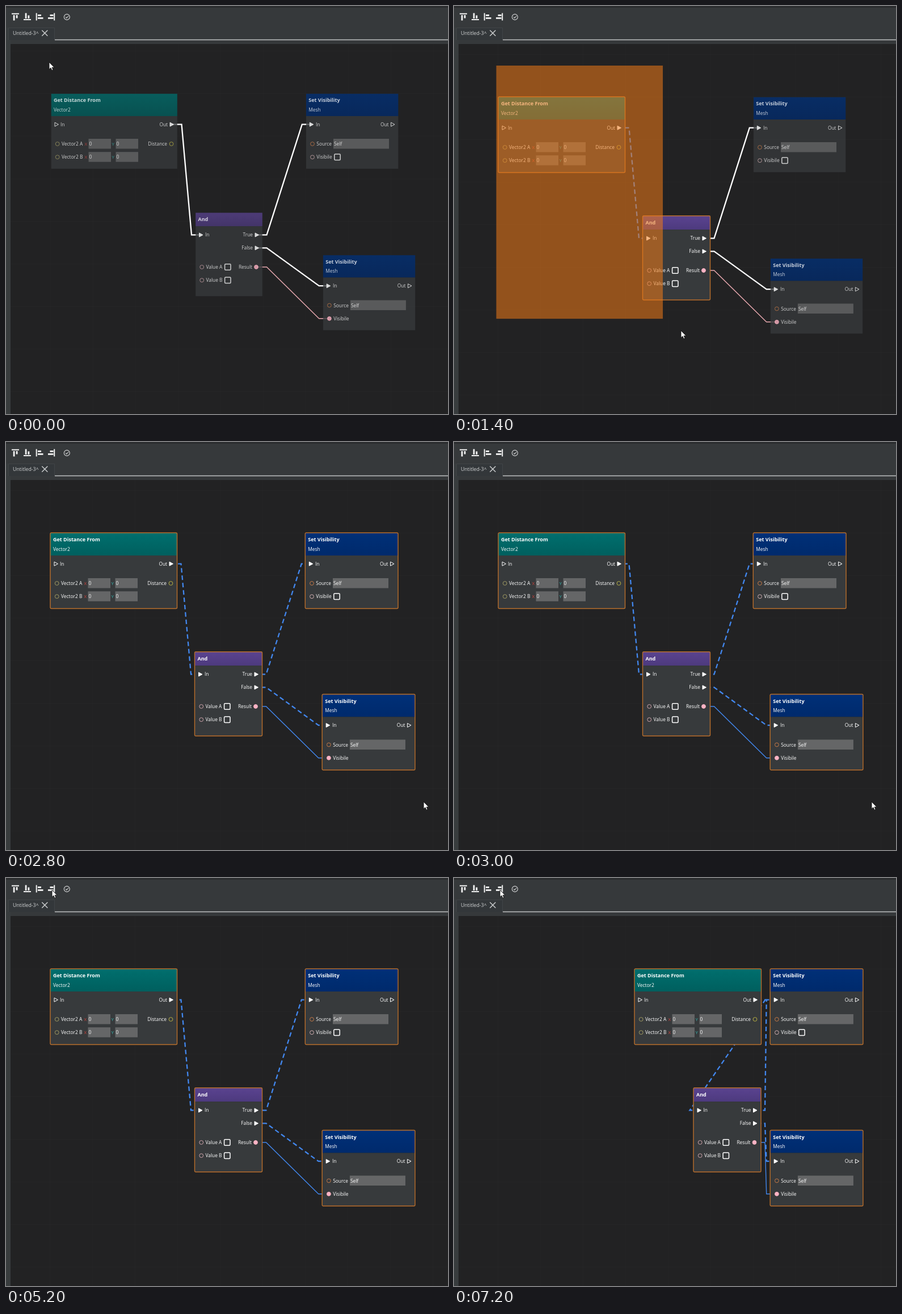
These frames come from a looping animation (779x719 px, 7.4 s). An HTML page with a canvas:

```html
<!DOCTYPE html>
<html lang="en">
<head>
<meta charset="utf-8">
<title>Node graph: select and align</title>
<style>
  html, body { margin: 0; width: 100%; height: 100%; overflow: hidden; background: #222223; }
  canvas { display: block; }
</style>
</head>
<body>
<canvas id="stage" width="779" height="719"></canvas>
<script>
const ctx = document.getElementById('stage').getContext('2d');
const LOOP = 7400, STEP = 200;
const FONT = '"Open Sans", "Noto Sans", sans-serif';
const PINK = '#ffb3c4', ORANGE = '#b96e2b', BLUE = '#4287ee';

// x moves to alignedX when "align right" is pressed
const nodes = [
  { kind: 'distance', title: 'Get Distance From', sub: 'Vector2', x: 78, alignedX: 318, y: 160, w: 223.5, h: 133.5, head: 40, colors: ['#006f6e', '#005f5e'] },
  { kind: 'and', title: 'And', x: 332.5, alignedX: 422, y: 369.7, w: 119, h: 148.3, head: 24.5, colors: ['#5a4390', '#4d3a7e'] },
  { kind: 'mesh', title: 'Set Visibility', sub: 'Mesh', x: 527.3, alignedX: 557.2, y: 160, w: 163.7, h: 133.5, head: 40, colors: ['#003078', '#002a6c'] },
  { kind: 'mesh', linked: true, title: 'Set Visibility', sub: 'Mesh', x: 557.2, alignedX: 557.2, y: 444.5, w: 163.7, h: 133.5, head: 40, colors: ['#003078', '#002a6c'] },
];
const wires = [
  { from: 0, fromY: 54.7, to: 1, toY: 39.7 },
  { from: 1, fromY: 39.7, to: 2, toY: 54.7 },
  { from: 1, fromY: 62.7, to: 3, toY: 54.7 },
  { from: 1, fromY: 96.3, to: 3, toY: 112.3, data: true },
];
// time, x, y of the pointer tip
const pointerPath = [
  [0, 76, 99], [300, 75, 105], [560, 75, 105], [940, 165, 408], [1000, 187, 433],
  [1400, 400, 572], [1940, 693, 631], [2000, 700, 632], [2500, 736, 634],
  [3200, 736, 634], [4200, 139, 47], [4600, 81, 21],
];

const clamp = v => Math.max(0, Math.min(1, v));
const mix = (a, b, k) => a + (b - a) * k;

function pointerAt(t) {
  const i = pointerPath.findIndex(p => p[0] > t);
  if (i < 0) return pointerPath.at(-1).slice(1);
  const [a, b] = [pointerPath[i - 1], pointerPath[i]];
  const k = (t - a[0]) / (b[0] - a[0]);
  return [mix(a[1], b[1], k), mix(a[2], b[2], k)];
}

function rect(x, y, w, h, color) {
  ctx.fillStyle = color;
  ctx.fillRect(x, y, w, h);
}

function line(points, color, width = 1) {
  ctx.beginPath();
  points.forEach(p => ctx.lineTo(...p));
  ctx.strokeStyle = color;
  ctx.lineWidth = width;
  ctx.stroke();
}

function text(str, x, y, { size = 8.4, bold, color = '#fff', align = 'left' } = {}) {
  ctx.font = `${bold ? 700 : 400} ${size}px ${FONT}`;
  ctx.textAlign = align;
  ctx.fillStyle = color;
  ctx.fillText(str, x, y + 3);
}

function arrow(x, y, filled) {
  ctx.beginPath();
  ctx.moveTo(x - 3, y - 3.5);
  ctx.lineTo(x + 3.5, y);
  ctx.lineTo(x - 3, y + 3.5);
  ctx.closePath();
  ctx.strokeStyle = ctx.fillStyle = '#fff';
  ctx.lineWidth = 1;
  ctx.stroke();
  if (filled) ctx.fill();
}

function pin(x, y, color, filled) {
  ctx.beginPath();
  ctx.arc(x, y, 3.4, 0, 7);
  ctx.strokeStyle = ctx.fillStyle = color;
  ctx.lineWidth = 1;
  ctx.stroke();
  if (filled) ctx.fill();
}

function checkbox(x, y) {
  ctx.beginPath();
  ctx.roundRect(x - 5.2, y - 5.2, 10.4, 10.4, 1.5);
  ctx.strokeStyle = '#fff';
  ctx.lineWidth = 1.5;
  ctx.stroke();
}

function field(x, y, w, value) {
  rect(x, y - 9, w, 17.5, '#656667');
  text(value, x + 1, y);
}

function input(y, label, color, filled) {
  pin(11.7, y, color, filled);
  text(label, 19, y);
}

function output(w, y, label, filled) {
  text(label, w - 17.5, y, { align: 'right' });
  arrow(w - 10.5, y, filled);
}

const bodies = {
  distance(w) {
    arrow(10, 54.7);
    text('In', 17, 54.7);
    output(w, 54.7, 'Out', true);
    ['Vector2 A', 'Vector2 B'].forEach((label, i) => {
      const y = 89 + 23.2 * i;
      input(y, label, '#a09a62');
      text('X', 59.5, y, { color: '#d0413a', size: 8 });
      field(66.5, y, 39.5, '0');
      text('Y', 107.5, y, { color: '#35b5af', size: 8 });
      field(114.5, y, 39.5, '0');
    });
    text('Distance', w - 18.5, 89, { align: 'right' });
    pin(w - 11, 89, '#b9b143');
  },
  and(w) {
    arrow(10, 39.7, true);
    text('In', 17.5, 39.7);
    output(w, 39.7, 'True', true);
    output(w, 62.7, 'False', true);
    ['Value A', 'Value B'].forEach((label, i) => {
      const y = 96.3 + 23.2 * i;
      input(y, label, '#cda3aa');
      checkbox(57.3, y);
    });
    text('Result', w - 18.5, 96.3, { align: 'right' });
    pin(w - 11.5, 96.3, PINK, true);
  },
  mesh(w, linked) {
    arrow(10, 54.7, true);
    text('In', 17.7, 54.7);
    output(w, 54.7, 'Out');
    input(89, 'Source', '#c57a48');
    field(48.7, 89, 98, 'Self');
    input(112.3, 'Visibile', linked ? PINK : '#d0aeb0', linked);
    if (!linked) checkbox(55.7, 112.3);
  },
};

function drawNode(n, x, y, selected) {
  ctx.save();
  ctx.translate(x, y);
  ctx.globalAlpha = selected ? 1 : 0.77;
  const inset = selected ? 0 : 0.7;
  const fill = ctx.createLinearGradient(0, 0, 0, n.head);
  n.colors.forEach((c, i) => fill.addColorStop(i, c));
  rect(inset, inset, n.w - 2 * inset, n.head - inset, fill);
  rect(inset, n.head, n.w - 2 * inset, n.h - n.head - inset, '#373a3c');
  if (selected) {
    ctx.beginPath();
    ctx.roundRect(0, 0, n.w, n.h, 2);
    ctx.strokeStyle = ORANGE;
    ctx.lineWidth = 1.4;
    ctx.stroke();
  }
  text(n.title, 5, 12, { bold: true, size: 9 });
  if (n.sub) text(n.sub, 5, 28.7);
  bodies[n.kind](n.w, n.linked);
  ctx.restore();
}

// Drawn from the receiving end, so the marching dashes stay anchored there
function drawWire(wire, placed, t) {
  const a = placed[wire.from], b = placed[wire.to];
  const x1 = a.x + a.n.w - 11, y1 = a.y + wire.fromY;
  const x2 = b.x + 10, y2 = b.y + wire.toY;
  const selected = a.selected && b.selected;
  if (selected && !wire.data) {
    ctx.setLineDash([8, 5]);
    ctx.lineDashOffset = t * 0.039 - 6.6;
  }
  line([[x2, y2], [x2 - 16.5, y2], [x1 + 18, y1], [x1, y1]],
    selected ? BLUE : wire.data ? '#e9a9b0' : '#fff', wire.data ? 1.4 : 2.3);
  ctx.setLineDash([]);
}

function drawChrome() {
  rect(0, 0, 779, 67, '#36393b');
  rect(0, 0, 779, 3, '#2b2d2f');
  rect(0, 38, 8, 681, '#383c3e');
  rect(4, 38, 82, 22, '#33373a');
  line([[4.5, 60], [4.5, 38.5], [85.5, 38.5], [85.5, 59.5]], '#404447');
  rect(86, 58.8, 693, 1.5, '#bfc1c2');
  text('Untitled-3^', 12, 48.3, { size: 8.8, color: '#d2d4d5' });
  line([[63.3, 42.8], [73.3, 52.8]], '#c6c8c9', 1.6);
  line([[73.3, 42.8], [63.3, 52.8]], '#c6c8c9', 1.6);

  const bars = [
    [10, 12.7, 13, 2], [12.7, 16, 2.8, 9.5], [17.7, 16, 2.8, 5.5],
    [31, 23, 13, 2], [33.7, 12.5, 2.8, 9.5], [38.5, 16.5, 2.8, 5.5],
    [52.7, 12.5, 2, 13], [56, 15, 6, 2.8], [56, 20, 9.5, 2.8],
    [84.2, 12.5, 2, 13], [77.5, 15, 6, 2.8], [74, 20, 9.5, 2.8],
  ];
  bars.forEach(b => rect(...b, '#f2f2f2'));
  ctx.beginPath();
  ctx.arc(107.3, 19.4, 5, 0, 7);
  ctx.strokeStyle = '#d4d5d6';
  ctx.lineWidth = 1.1;
  ctx.stroke();
  line([[105, 19.3], [106.8, 21.2], [110.2, 17.5]], '#d4d5d6', 1.1);
}

function drawPointer(x, y) {
  ctx.save();
  ctx.translate(x, y);
  ctx.beginPath();
  [[0, 0], [0, 12.5], [2.9, 9.9], [4.9, 14.4], [7, 13.5], [5.1, 9.2], [9, 9.2]].forEach(p => ctx.lineTo(...p));
  ctx.closePath();
  ctx.fillStyle = '#fff';
  ctx.strokeStyle = '#111';
  ctx.lineWidth = 0.9;
  ctx.fill();
  ctx.stroke();
  ctx.restore();
}

function render(t) {
  const pan = 1 - clamp(t / 300), panX = pan, panY = -6 * pan;
  const slide = clamp((t - 5600) / 500);
  const [endX, endY] = pointerAt(Math.max(0, Math.min(t, 2060) - 60));
  const placed = nodes.map(n => {
    const x = mix(n.x, n.alignedX, slide) + panX, y = n.y + panY;
    return { n, x, y, selected: t > 560 && endX > n.x && endY > n.y };
  });

  rect(0, 0, 779, 719, '#222223');
  for (let p = 10; p < 779; p += 75) {
    rect(p - 8 + panX, 67, 1, 652, 'rgba(255,255,255,.012)');
    rect(8, p + panY, 771, 1, 'rgba(255,255,255,.012)');
  }
  wires.forEach(w => drawWire(w, placed, t));
  placed.forEach(p => drawNode(p.n, p.x, p.y, p.selected));
  if (t > 560 && t < 2300) rect(74.5, 105, endX - 74.5, endY - 105, 'rgba(240,123,23,.55)');
  drawChrome();
  drawPointer(...pointerAt(t));
}

function frame() {
  const t = performance.now() % LOOP;
  render(Math.floor(t / STEP) * STEP);
  requestAnimationFrame(frame);
}
frame();
</script>
</body>
</html>
```
